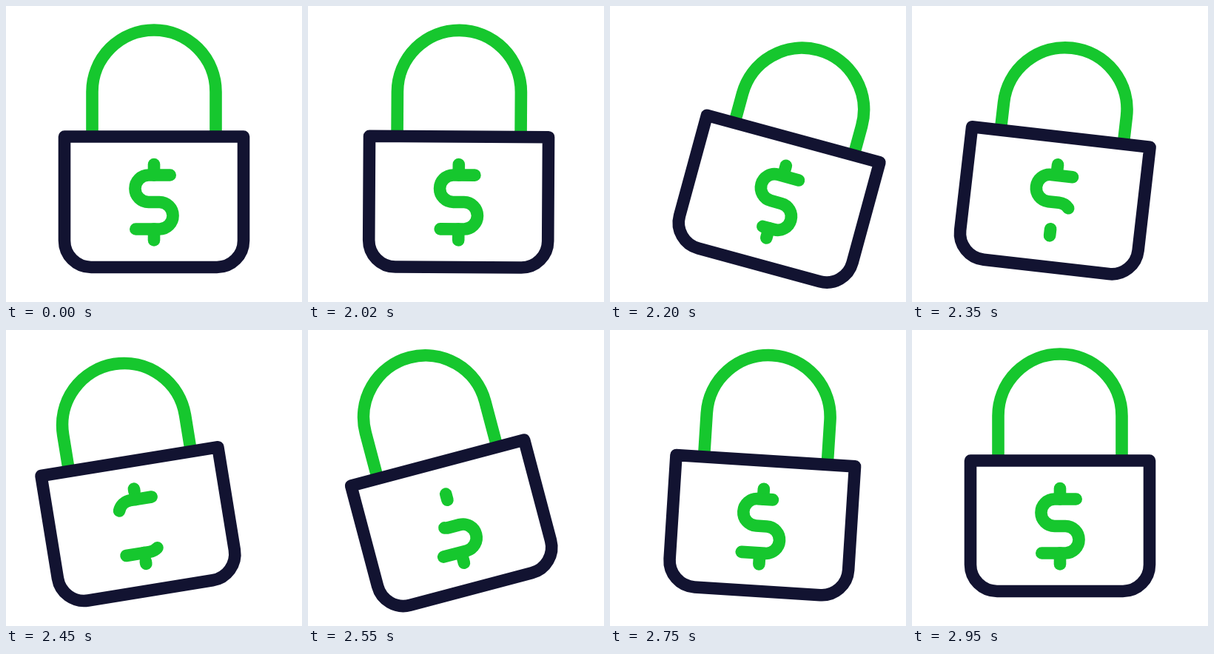
Recreate the animation shown at these times as an HTML page. Size 400x400 px, loop 2970 ms.

```html
<!DOCTYPE html>
<html lang="en">
<head>
<meta charset="utf-8">
<title>Swinging padlock</title>
<style>
  html, body { margin: 0; width: 100%; height: 100%; overflow: hidden; background: #fff; }
  svg { display: block; width: 100%; height: 100%; }
  path { fill: none; stroke-width: 16.6; stroke-linejoin: round; }
  .green { stroke: #16c72e; }
  .navy { stroke: #121331; }
  #dollar { stroke-linecap: round; stroke-dasharray: 100 50; }
</style>
</head>
<body>
<svg viewBox="0 0 400 400">
  <clipPath id="aboveBody"><rect x="0" y="-100" width="400" height="276"/></clipPath>
  <g id="lock">
    <g clip-path="url(#aboveBody)">
      <path id="shackle" class="green" d="M116.5 228V116a83.5 83.5 0 0 1 167 0V228"/>
    </g>
    <path class="navy" d="M79 176.5H321V317a36 36 0 0 1-36 36H115a36 36 0 0 1-36-36Z"/>
    <g id="dollar">
      <path class="green" pathLength="100" d="M200 214V228.5"/>
      <path class="green" pathLength="100" d="M200 301.5V316.5"/>
      <path class="green" pathLength="100"
        d="M221.7 228.5H192.7a18.25 18.25 0 0 0 0 36.5H207.3a18.25 18.25 0 0 1 0 36.5H175.3"/>
    </g>
  </g>
</svg>
<script>
const LOOP = 2970, STEP = 25;
const START = 2005, REDRAW = 900, DASH_PERIOD = 150;
const PIVOT = '200 264.75';
const [lock, shackle, dollar] = ['lock', 'shackle', 'dollar'].map(id => document.getElementById(id));

const clamp = u => Math.min(1, Math.max(0, u));
const smooth = u => u * u * (3 - 2 * u);
const easeInOut = u => u ** 2.2 / (u ** 2.2 + (1 - u) ** 2.2);

// Swings smoothly from one [time, value] turning point to the next.
const swing = (t, points) => points.slice(1).reduce((value, [t1, v1], i) => {
  const [t0, v0] = points[i];
  return value + (v1 - v0) * smooth(clamp((t - t0) / (t1 - t0)));
}, points[0][1]);

// The sideways swing sets off from its middle, already at full speed.
const shift = t => swing(t, [[START - 210, -24.7], [START + 210, 24.7], [2418, -20.5], [2660, 11.5], [2820, 0]]);
const tilt = t => swing(t, [[START, 0], [2242, 16.6], [2530, -15.2], [2775, 4.2], [2950, 0]]);
const sink = t => swing(t, [[START, 0], [2290, 25.3], [2660, -11], [2780, 3.5], [2950, 0]]);
const travel = t => DASH_PERIOD * easeInOut(clamp((t - START) / REDRAW));

function draw(now) {
  // Poses advance every 25 ms, switching on 10 ms ticks.
  const tick = Math.floor(now % LOOP / 10) * 10;
  const t = Math.max(START, Math.floor((tick + 5) / STEP) * STEP);
  const drop = sink(t);
  lock.setAttribute('transform', `translate(${shift(t)} 0) rotate(${tilt(t)} ${PIVOT})`);
  shackle.setAttribute('transform', `translate(${0.06 * drop} ${drop})`);
  dollar.setAttribute('stroke-dashoffset', travel(t) % DASH_PERIOD);
}

const start = performance.now();
function loop() {
  draw(performance.now() - start);
  requestAnimationFrame(loop);
}
loop();
</script>
</body>
</html>
```
